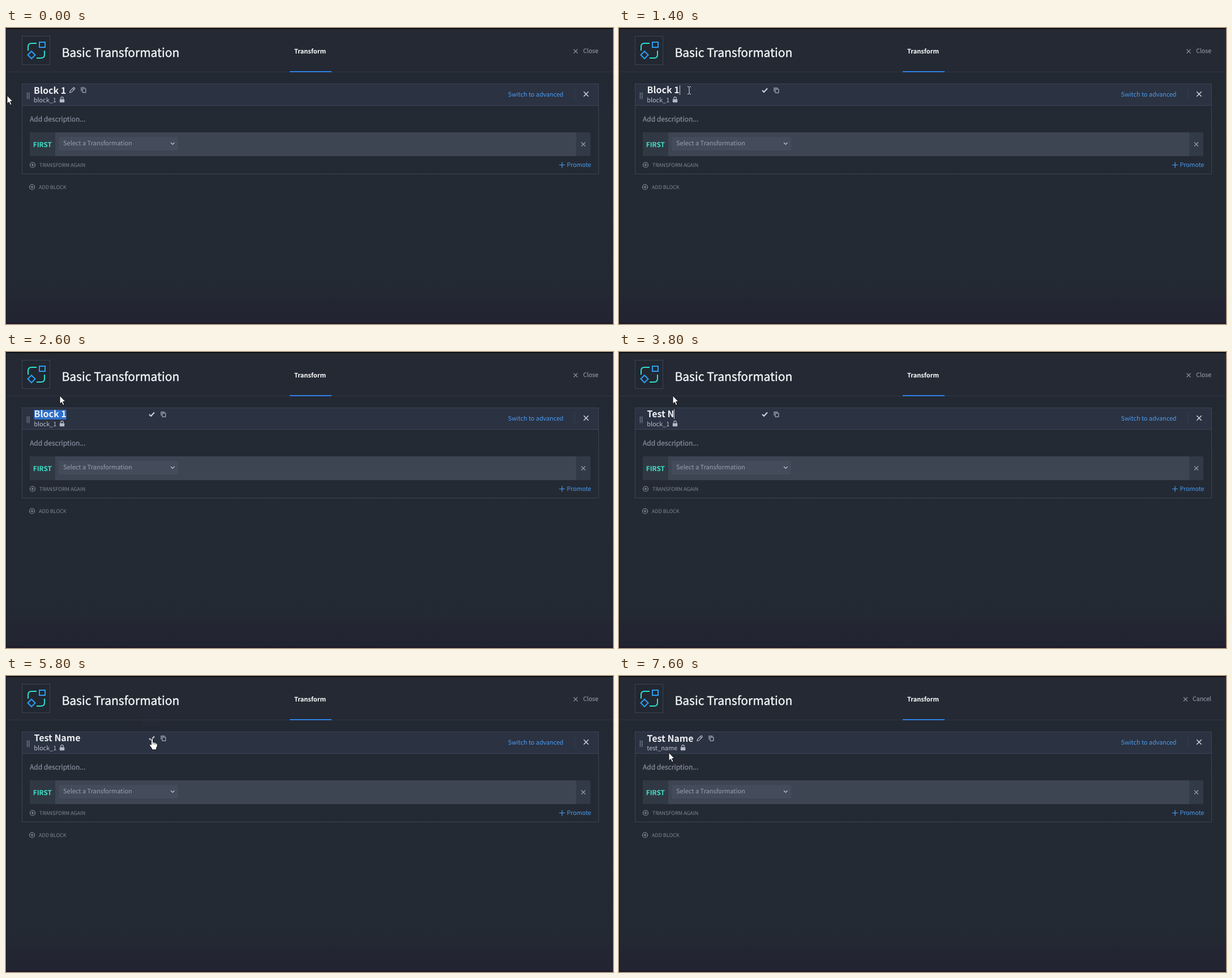
An HTML page for the animation above (8000 ms loop, 1072 by 522 pixels).

```html
<!DOCTYPE html>
<html lang="en">
<head>
<meta charset="utf-8">
<title>Block rename</title>
<style>
html, body { margin: 0; width: 100%; height: 100%; overflow: hidden; background: #232a33; }
svg { display: block; width: 1072px; height: 522px; }
text {
  font-family: "Noto Sans CJK JP", "Noto Sans CJK SC", "Noto Sans CJK", "Noto Sans", sans-serif;
  font-size: 10.8px; text-rendering: geometricPrecision; white-space: pre;
}
.bold { font-weight: 700; }
.name { font-weight: 700; font-size: 16px; fill: #eef0f4; }
.slug { fill: #b9bfca; font-size: 10.9px; }
.small { font-size: 9px; fill: #7f8795; }
.link { fill: #4b9cf0; }
.mute { fill: #868d9c; stroke: #868d9c; stroke-width: .25; }
.line { fill: none; stroke-width: 1.2; }
.cursor { fill: #fff; stroke: #0b0d12; stroke-width: 1; stroke-linejoin: round; }
</style>
</head>
<body>
<svg viewBox="0 0 1072 522">
  <defs>
    <linearGradient id="page" x1="0" y1="78" x2="0" y2="519" gradientUnits="userSpaceOnUse">
      <stop offset="0" stop-color="#232933"/>
      <stop offset=".3" stop-color="#232a33"/>
      <stop offset=".88" stop-color="#232932"/>
      <stop offset=".92" stop-color="#232532"/>
      <stop offset="1" stop-color="#232432"/>
    </linearGradient>
    <g id="pencil" class="line" stroke="#b4bac5">
      <path d="M-4.5 4.5L-3.8 1.5L2 -4.3Q3 -5 4 -4T4.3 -2L-1.5 3.8ZM.8 -3L3 -.8"/>
    </g>
    <g id="copy" class="line" stroke="#a9b0bc">
      <path d="M-4 2V-4.2H2.4"/><rect x="-1.9" y="-2.2" width="5.8" height="6.6" rx=".6"/>
    </g>
    <g id="lock">
      <rect x="-4.2" y="-1" width="8.4" height="5.8" rx=".8" fill="#b4bac5"/>
      <path class="line" stroke="#b4bac5" d="M-2.3 -1V-2.4A2.3 2.4 0 0 1 2.3 -2.4V-1"/>
    </g>
    <g id="plus" class="line" stroke="#8a92a0" stroke-width="1">
      <circle r="4.5"/><path d="M-2.4 0H2.4M0 -2.4V2.4"/>
    </g>
    <path id="cross" class="line" d="M-3.5 -3.5L3.5 3.5M3.5 -3.5L-3.5 3.5"/>
  </defs>

  <rect width="1072" height="522" fill="url(#page)"/>
  <rect width="1072" height="77" fill="#242933"/>
  <path d="M0 77.5H1072" stroke="#303644"/>
  <rect width="1072" height="1.6" fill="#05070a"/>
  <rect width="1" height="522" fill="#10141a"/>
  <rect y="519" width="1072" height="3" fill="#1f1b2a"/>

  <rect x="28.5" y="14.5" width="49" height="50" fill="#222831" stroke="#3c4452"/>
  <g fill="none" stroke-width="2">
    <path stroke="#2fe0cf" d="M39 40V33Q39 27 45 27H54M68 40V47Q68 53 62 53H54"/>
    <path stroke="#2b9df4" d="M59 25H69V34H59ZM45 41L51.5 47.5L45 54L38.5 47.5Z"/>
  </g>
  <text x="98.5" y="51" style="font-size:21px" fill="#f4f5f8" stroke="#f4f5f8" stroke-width=".4">Basic Transformation</text>
  <text class="bold" x="509" y="45" style="font-size:11px" fill="#fff">Transform</text>
  <rect x="501" y="76" width="74" height="2" fill="#2f80e4"/>
  <use id="exitMark" href="#cross" y="41" stroke="#8a92a0"/>
  <text id="exit" class="mute" x="1046" y="43.5" text-anchor="end" style="font-size:10.5px"></text>

  <rect x="28.5" y="98.5" width="1018" height="159" fill="#242a34" stroke="#3b4455"/>
  <rect x="29" y="99" width="1017" height="37" fill="#2b3241"/>
  <path d="M29 136.5H1046" stroke="#3d4658"/>
  <path d="M1004.5 108V128" stroke="#353d4c"/>
  <path d="M37.5 114V125M40.7 114V125" stroke="#9aa1ae" stroke-width="1.5" stroke-dasharray="1.4 1.1"/>
  <text class="link" x="886.5" y="121">Switch to advanced</text>
  <use href="#cross" transform="translate(1024.5 116.5) scale(1.2)" stroke="#d3d7df"/>
  <text class="mute" x="42" y="165" style="font-size:12px">Add description...</text>

  <rect x="42" y="184" width="990" height="42" fill="#3d4553"/>
  <rect x="42" y="184" width="45" height="42" fill="#303943"/>
  <rect x="1007" y="184" width="25" height="42" fill="#323947"/>
  <rect x="93" y="192" width="211" height="24" rx="1" fill="#444b5a"/>
  <text class="bold" x="47.8" y="209.5" style="font-size:11.8px" fill="#3fe0c8">FIRST</text>
  <text x="101" y="207" style="font-size:11px" fill="#9aa1ae">Select a Transformation</text>
  <path class="line" style="stroke-width:1.5" stroke="#b4bac5" d="M291 202L294.3 205.3L297.6 202"/>
  <use href="#cross" x="1019.5" y="205" stroke="#9aa1ae"/>

  <use href="#plus" x="47" y="241.5"/>
  <text class="small" x="59" y="245">TRANSFORM AGAIN</text>
  <path class="line" stroke="#4b9cf0" d="M977 241.5H987M982 236.5V246.5"/>
  <text class="link" x="990.5" y="245" style="font-size:10.6px">Promote</text>
  <use href="#plus" x="46" y="280.5"/>
  <text class="small" x="58" y="283.8">ADD BLOCK</text>

  <rect id="ghost" x="241" y="60" width="32" height="28" rx="3" fill="#2b2d3a" opacity=".45"/>
  <rect id="select" y="102" height="17" fill="#2f6fca"/>
  <text id="name" class="name"></text>
  <rect id="caret" y="101" width="1" height="17" fill="#c9ced8"/>
  <text id="slug" class="slug"></text>
  <use id="lockIcon" href="#lock"/>
  <use id="editIcon" href="#pencil"/>
  <path id="check" class="line" style="stroke-width:2" stroke="#d0d4dc" d="M253 110L256 113L262 106.5"/>
  <use id="copyIcon" href="#copy"/>

  <g class="cursor">
    <path id="arrow" d="M0 0V14.5L3.3 11.5L5.6 17L8 16L5.7 10.6H10Z"/>
    <g id="hand">
      <path d="M-1.6 1.5Q0 -.8 1.6 1.5V6.8Q3.2 5.9 4.2 7.5Q5.8 6.8 6.7 8.3Q9 8 9.2 10.5V14L7.6 17V20H-.4V18L-4.3 12.6Q-5 10 -3 10.1L-1.6 11.6Z"/>
      <path fill="none" stroke-width=".7" d="M1.6 7V10.5M4.2 7.8V10.8M6.7 8.5V11"/>
    </g>
    <g id="grab">
      <path d="M-3.2 8V5.5L-6.8 1Q-7.2 -1.2 -5 -.6L-3.7 .8L-4.7 -4.5Q-3.8 -6.5 -2.4 -4.8L-1.7 -6.5Q-.2 -8.5 .9 -6.5L1.2 -5.8Q3 -7.2 3.9 -5L4.2 -3Q6.2 -4.2 6.7 -1.8L6 4L4.4 6V8Z"/>
      <path fill="none" stroke-width=".7" d="M-2.2 -4.8L-1.6 -.5M1 -6V-.7M3.8 -4.5L3.4 -.5"/>
    </g>
    <path id="beam" fill="none" style="stroke:#e6e9ee" d="M-3 -6.5H-1L0 -5.5L1 -6.5H3M0 -5.5V5.5M-3 6.5H-1L0 5.5L1 6.5H3"/>
  </g>
</svg>
<script>
const LOOP = 8000, TICK = 200;
const $ = id => document.getElementById(id);
const show = (id, on) => { $(id).style.display = on ? "" : "none"; };
const put = (id, attrs) => { for (const k in attrs) $(id).setAttribute(k, attrs[k]); };

// time, kind, x, y
const pointer = [
  [0, "arrow", 2, 119], [200, "arrow", 5, 120], [400, "arrow", 26, 121],
  [600, "arrow", 68, 118], [800, "hand", 113, 113], [1000, "hand", 122, 111],
  [1400, "beam", 124, 110], [2000, "beam", 106, 111], [2200, "beam", 68, 114],
  [2400, "beam", 37, 116], [2600, "arrow", 95, 77],
  [4800, "arrow", 102, 79], [5000, "arrow", 138, 87], [5200, "beam", 196, 107],
  [5400, "beam", 238, 109], [5600, "hand", 257, 110], [5800, "hand", 258, 110],
  [6200, "grab", 254, 108], [6400, "grab", 252, 107],
  [6800, "grab", 188, 113], [7000, "grab", 112, 121],
  [7200, "arrow", 79, 139], [7400, "arrow", 73, 140], [7600, "arrow", 88, 135]
];
// time, text, mode
const names = [
  [0, "Block 1", "view"], [1400, "Block 1", "edit"],
  [3000, "T", "edit"], [3200, "Te", "edit"], [3400, "Tes", "edit"],
  [3600, "Test", "edit"], [3800, "Test N", "edit"], [4000, "Test Na", "edit"],
  [4200, "Test Name", "edit"], [6200, "Test Name", "saved"]
];
// icon places for each mode
const layout = {
  view:  { x: 49, y: 116.3, slugY: 130.5, lock: 99, edit: 117, copy: 137 },
  edit:  { x: 49.5, y: 115.3, slugY: 130.5, lock: 99, edit: 117, copy: 278 },
  saved: { x: 49.5, y: 116.3, slugY: 131.3, lock: 113, edit: 142.5, copy: 163 }
};
const at = (table, t) => table.filter(row => row[0] <= t).pop();

function draw(t) {
  const [, text, mode] = at(names, t);
  const [, kind, px, py] = at(pointer, t);
  const spot = layout[mode], editing = mode === "edit", saved = mode === "saved";

  $("name").textContent = text;
  put("name", { x: spot.x, y: spot.y });
  $("slug").textContent = saved ? "test_name" : "block_1";
  put("slug", { x: spot.x - .3, y: spot.slugY });
  put("lockIcon", { x: spot.lock, y: 126.5 });
  put("editIcon", { x: spot.edit, y: saved ? 110 : 109.5 });
  put("copyIcon", { x: spot.copy, y: saved || editing ? 110 : 109.2 });
  show("editIcon", !editing);
  show("check", editing);
  show("ghost", t >= 5600 && t < 6200);

  const end = spot.x + $("name").getComputedTextLength();
  const selecting = t >= 2000 && t < 3000;
  const from = Math.max(spot.x, t < 2400 ? px : spot.x);
  show("select", selecting);
  put("select", { x: from, width: Math.max(0, end - from) });
  show("caret", editing && !selecting && t < 4200);
  put("caret", { x: Math.round(end) });

  $("exit").textContent = saved ? "Cancel" : "Close";
  put("exitMark", { x: saved ? 1000.5 : 1006 });

  for (const id of ["arrow", "hand", "grab", "beam"]) show(id, id === kind);
  put(kind, { transform: `translate(${px} ${py})` });
}

let last = -1;
function frame() {
  const t = Math.floor(performance.now() % LOOP / TICK) * TICK;
  if (t !== last) draw(last = t);
  requestAnimationFrame(frame);
}
draw(0);
frame();
</script>
</body>
</html>
```
